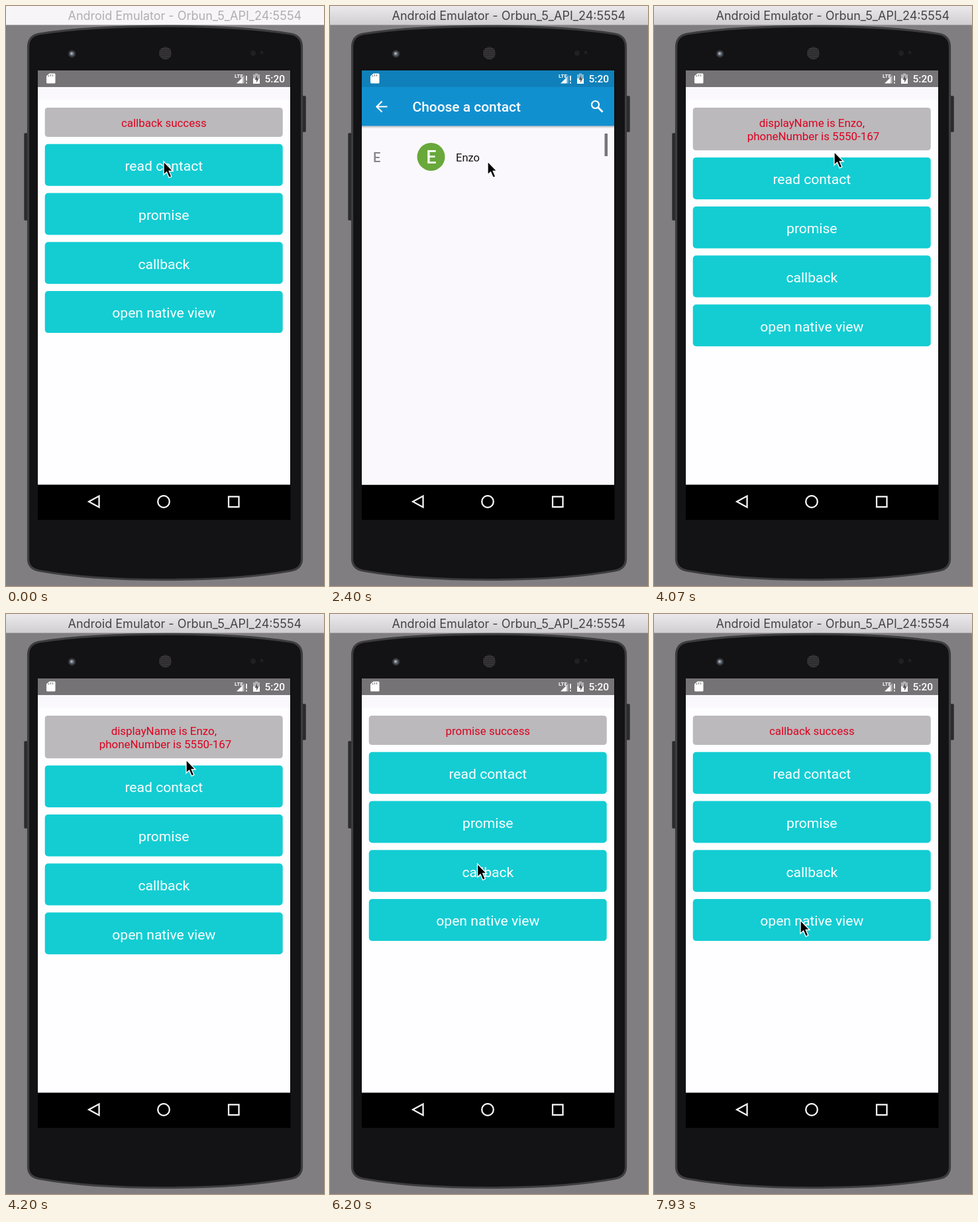
An HTML page for the animation above (8 s loop, 480 px wide and 873 px high).

```html
<!DOCTYPE html>
<html lang="en">
<head>
<meta charset="utf-8">
<title>Emulator demo</title>
<style>
  html, body { margin: 0; width: 100%; height: 100%; overflow: hidden; background: #807e80; }
  svg { display: block; width: 100%; height: 100%; }
  text { font-family: Roboto, "Open Sans", sans-serif; }
  .mid { text-anchor: middle; }
  .label { font-size: 21.1px; fill: #fff; }
  .result { font-size: 16.9px; fill: #dc0020; }
  .bold { font-weight: 500; }
  .line { fill: none; stroke: #fff; stroke-width: 2.2; }
</style>
</head>
<body>
<svg viewBox="0 0 480 873" preserveAspectRatio="none">
  <defs>
    <linearGradient id="active" x2="0" y2="1">
      <stop offset="0" stop-color="#ebe9eb"/><stop offset="1" stop-color="#d0ced0"/>
    </linearGradient>
    <linearGradient id="shade" x2="0" y2="1">
      <stop offset="0" stop-color="#000" stop-opacity=".25"/><stop offset="1" stop-color="#000" stop-opacity="0"/>
    </linearGradient>
    <pattern id="mesh" width="3" height="3" patternUnits="userSpaceOnUse">
      <rect width="3" height="3" fill="#201f20"/><circle cx="1.5" cy="1.5" r="1" fill="#555355"/>
    </pattern>
    <clipPath id="screen"><rect x="48" y="97" width="381" height="623.5"/></clipPath>
  </defs>

  <rect width="480" height="873" fill="#807e80"/>
  <rect id="bar" width="480" height="28.5"/>
  <text id="title" x="93.500" y="21" style="font-family:Inter,sans-serif;font-size:18px">Android Emulator - Orbun_5_API_24:5554</text>

  <g fill="#2b2a2c" stroke="#434244">
    <rect x="27.5" y="191.5" width="7" height="131" rx="1.5"/>
    <rect x="445.5" y="135.5" width="7" height="54" rx="1.5"/>
  </g>
  <path d="M33.5 62Q33.5 45 50 42C150 26.500 330 26.500 430 42Q446.5 45 446.5 62V832Q446.5 847 430 850C330 868 150 868 50 850Q33.5 847 33.5 832Z"
        fill="#131214" stroke="#3d3c3e" stroke-width="3.2"/>
  <circle cx="99.5" cy="72" r="5.8" fill="#343538"/>
  <circle cx="99.5" cy="72" r="3.6" fill="#59616b"/>
  <circle cx="99" cy="71.5" r="1.9" fill="#a3abb4"/>
  <circle cx="240.5" cy="71" r="9.5" fill="url(#mesh)"/>
  <g fill="#211f21"><circle cx="373" cy="71" r="4"/><circle cx="386" cy="70" r="2.5"/></g>

  <rect x="48" y="97" width="381.500" height="676.5" fill="#000"/>
  <g clip-path="url(#screen)">
    <rect x="48" y="97" width="382" height="624" fill="#fefdff"/>
    <rect x="48" y="122" width="382" height="19" fill="#faf8fc"/>
    <rect x="48" y="97" width="382" height="25" fill="#757375"/>
    <rect id="box" x="58.7" y="153" width="359" rx="4.5" fill="#bbb9bb"/>
    <text class="result mid" x="238.3" y="182" id="line1"></text>
    <text class="result mid" x="240.5" y="202" id="line2"></text>
    <g id="buttons"></g>

    <g id="contacts">
      <rect x="48" y="97" width="382" height="680" fill="#faf8fc"/>
      <rect x="48" y="97" width="382" height="25" fill="#0f80b9"/>
      <rect x="48" y="122" width="382" height="58.5" fill="#1190d0"/>
      <rect x="48" y="180.5" width="382" height="4" fill="url(#shade)"/>
      <path class="line" d="M86.5 151.5H71M78.5 143.5L70.5 151.5L78.5 159.5"/>
      <text class="bold" x="124.5" y="159" font-size="20.9" fill="#fff">Choose a contact</text>
      <circle class="line" cx="400.5" cy="148.5" r="5.5"/>
      <path class="line" d="M404.5 152.5L411.5 159.5" style="stroke-width:2.8"/>
      <text class="bold" x="65" y="235" font-size="20" fill="#868488">E</text>
      <circle cx="152.5" cy="227" r="21" fill="#69a83b"/>
      <text class="bold mid" x="153" y="237" font-size="27" fill="#fff">E</text>
      <text x="190" y="233.5" font-size="16.5" fill="#151415">Enzo</text>
      <rect x="414.5" y="192" width="4.5" height="34" fill="#77757a"/>
    </g>
  </g>

  <g fill="#fff">
    <path d="M65.5 101.5H73Q74.500 101.5 74.500 103V115Q74.500 116.5 73 116.5H62.500Q61 116.5 61 115V105.500Z"/>
    <path d="M64.5 106.5v-2.5M67.5 106v-3M70.5 106v-3" stroke="#858385" stroke-width="1.2"/>
    <text x="345" y="107.5" font-size="8" font-weight="700">LTE</text>
    <path d="M348 116.5L357.5 107V116.5Z"/>
    <path d="M358 116.5V106L360 104V116.5Z" opacity=".4"/>
    <path d="M362 105h1.8v7.500h-1.800zM362 114.500h1.800v2h-1.800z"/>
    <path d="M376 101.5h4v1.5h3v14h-10v-14h3z" opacity=".45"/>
    <path d="M373 109h10v8h-10z"/>
    <path d="M379 104.5L375.5 111H378V115.5L381.5 109H379Z" fill="#555"/>
    <text class="bold" x="390.5" y="115" font-size="15.5">5:20</text>
  </g>
  <g class="line">
    <path d="M125 746L140.5 737.5V754.5Z"/>
    <circle cx="238" cy="746" r="8.8"/>
    <rect x="336" y="738.5" width="15.5" height="15.5"/>
  </g>

  <g id="pointer">
    <circle id="ring" cx="1" cy="3.5" r="28" fill="none" stroke="#000" stroke-width="4"/>
    <path id="arrow" d="M0 0V20L4.5 15.9L8.2 24.3L11.800 22.700L8.200 14.500H14Z" fill="#000" stroke="#fff" stroke-width="1.3"/>
  </g>
</svg>
<script>
const LOOP = 8000;
const FOCUS = 1070;
const $ = id => document.getElementById(id);

// time, x, y of the pointer tip
const PATH = [
  [0, 238, 234], [2580, 238, 234], [3120, 272, 219.5], [4350, 272, 219.5],
  [5080, 235, 327.5], [5860, 235, 327.5], [6190, 222.5, 376],
  [7450, 222.5, 376], [7880, 221, 461]
];
const CLICKS = [1000, 1730, 3240, 5340, 6730];
const CLICK_MS = 190;

// time from which each message is shown
const MESSAGES = [
  [0, "callback success"],
  [3620, "displayName is Enzo,", "phoneNumber is 5550-167"],
  [5500, "promise success"],
  [6900, "callback success"]
];

["read contact", "promise", "callback", "open native view"].forEach((name, i) => {
  const y = 207.7 + i * 73.8;
  $("buttons").innerHTML +=
    `<rect x="58.7" y="${y}" width="359" height="63" rx="5" fill="#13cdd3"/>` +
    `<text class="label mid" x="238.3" y="${y + 40.3}">${name}</text>`;
});

const clamp = v => Math.min(1, Math.max(0, v));
const smooth = v => v * v * (3 - 2 * v);
const ramp = (t, from, to) => smooth(clamp((t - from) / (to - from)));

function pointerAt(t) {
  let [, x, y] = PATH[0];
  for (let i = 1; i < PATH.length; i++) {
    const k = ramp(t, PATH[i - 1][0], PATH[i][0]);
    x += (PATH[i][1] - PATH[i - 1][1]) * k;
    y += (PATH[i][2] - PATH[i - 1][2]) * k;
  }
  return [x, y];
}

function draw(t) {
  const focused = t >= FOCUS;
  $("bar").setAttribute("fill", focused ? "url(#active)" : "#f7f5f7");
  $("title").setAttribute("fill", focused ? "#454345" : "#b0aeb0");

  const [, first, second = ""] = MESSAGES.filter(m => t >= m[0]).pop();
  const extra = second ? 20.2 : 0;
  $("line1").textContent = first;
  $("line2").textContent = second;
  $("box").setAttribute("height", 44 + extra);
  $("buttons").setAttribute("transform", `translate(0 ${extra})`);

  const shown = ramp(t, 2030, 2290) * (1 - ramp(t, 3600, 3850));
  $("contacts").setAttribute("opacity", shown);
  $("contacts").setAttribute("transform", `translate(0 ${50 * (1 - shown)})`);

  $("pointer").setAttribute("transform", `translate(${pointerAt(t)})`);
  const pressed = CLICKS.some(c => t >= c && t < c + CLICK_MS);
  $("ring").setAttribute("opacity", pressed ? 1 : 0);
}

const start = performance.now();
function tick() {
  draw((performance.now() - start) % LOOP);
  requestAnimationFrame(tick);
}
draw(0);
requestAnimationFrame(tick);
</script>
</body>
</html>
```
